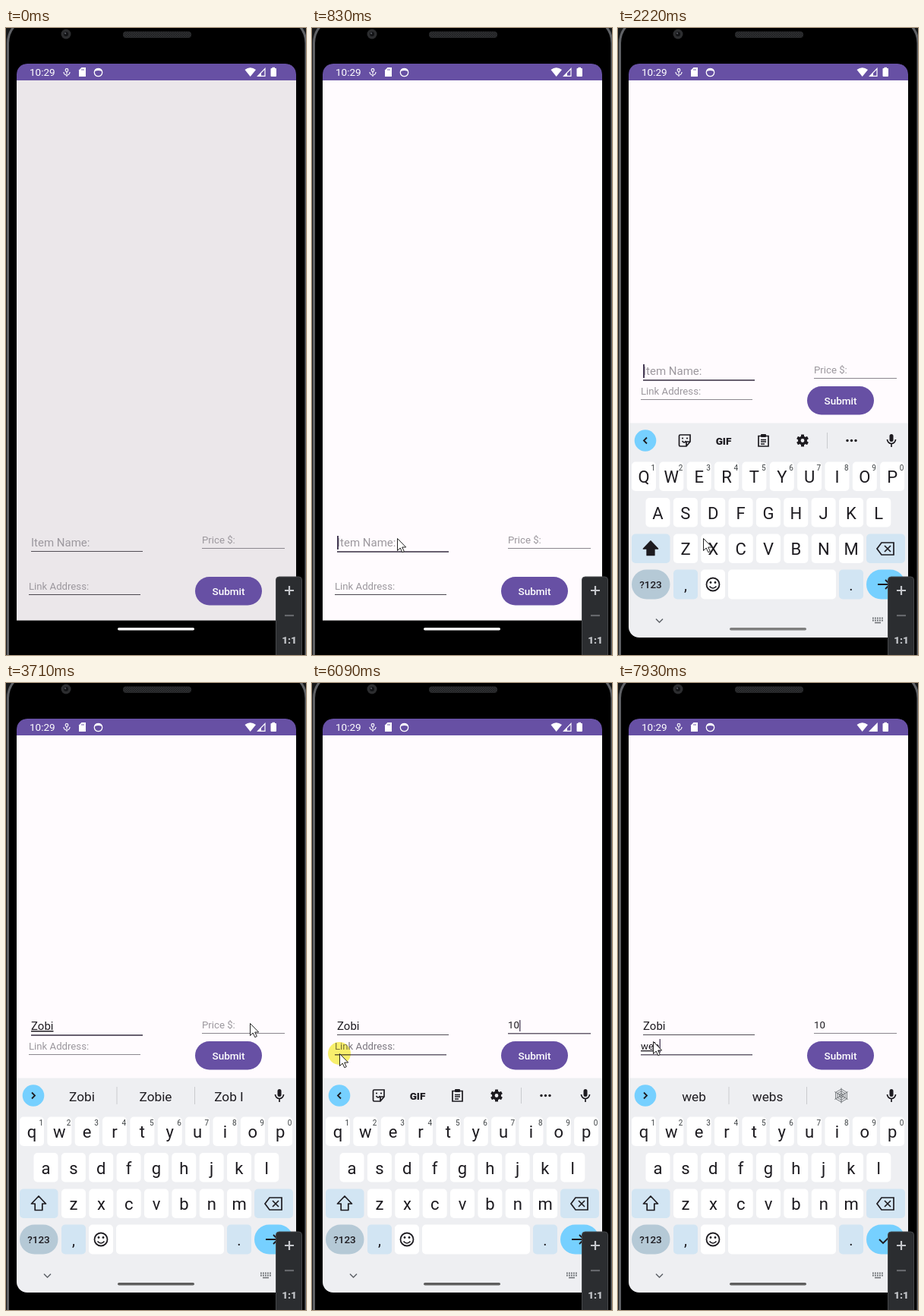
Recreate the animation shown at these times as an HTML page. Size 395 by 826 pixels, loop 8000 ms.

```html
<!DOCTYPE html>
<html lang="en">
<head>
<meta charset="utf-8">
<title>Item form</title>
<style>
  html, body { margin: 0; width: 100%; height: 100%; overflow: hidden; background: #000; }
  svg { display: block; width: 100%; height: 100%; font-family: Roboto, sans-serif; }
</style>
</head>
<body>
<svg id="stage" viewBox="0 0 395 826"></svg>
<script>
const LOOP = 8000;
const PURPLE = '#6750a4', INK = '#1d1b20', KEY_BLUE = '#d2e5f3', SKY = '#76d0ff';
const stage = document.getElementById('stage');
const pen = document.createElement('canvas').getContext('2d');

// Timelines: [start, value]
const itemText = [[0, ''], [2290, 'Z'], [2490, 'Zo'], [2630, 'Zob'], [2690, 'Zobi']];
const priceText = [[0, ''], [4450, '1'], [4730, '10']];
const linkText = [[0, ''], [6990, 'w'], [7120, 'we'], [7660, 'web']];
const focusOn = [[0, ''], [760, 'item'], [4120, 'price'], [6150, 'link']];
const caretReset = [[0, 0], [810, 810], [2290, 2290], [2760, 2760], [4120, 4120],
  [4450, 4450], [4730, 4730], [6150, 6150], [6990, 6990], [7120, 7120], [7660, 7660]];
const suggestions = [[0, null], [2290, ['Z', 'Zoo', 'Zip']], [2630, ['Zo', 'Zoo', 'Zone']],
  [2690, ['Zob', 'Zoo', 'Zone']], [2890, ['Zobi', 'Zobie', 'Zob I']], [4120, null],
  [6990, ['w', 'we', 'was']], [7390, ['we', 'were', 'weather']], [7860, ['web', 'webs', '']]];
const clicks = [[650, 770], [4020, 4150], [5930, 6130]];
// Pointer stops: [time, x, y]
const pointer = [[0, 190, 835], [200, 180, 830], [600, 112, 672], [3230, 112, 672], [3640, 318, 450],
  [3710, 321, 448], [3800, 330, 452], [4000, 311, 447], [5000, 311, 447], [5060, 301, 452],
  [5330, 170, 540], [5430, 110, 552], [5650, 20, 510], [5830, 36, 488], [6250, 36, 488],
  [6600, 46, 472], [8000, 46, 472]];

const clamp = v => Math.max(0, Math.min(1, v));
const ramp = (t, a, b) => clamp((t - a) / (b - a));
const mix = (a, b, k) => a + (b - a) * k;
const smooth = k => k * k * (3 - 2 * k);
const at = (list, t) => list.filter(s => s[0] <= t).pop()[1];

function pointerAt(t) {
  const i = pointer.findIndex(p => p[0] > t);
  const a = pointer[i - 1], b = pointer[i], k = smooth(ramp(t, a[0], b[0]));
  return [mix(a[1], b[1], k), mix(a[2], b[2], k)];
}

const rect = (x, y, w, h, fill, r = 0, more = '') =>
  `<rect x="${x}" y="${y}" width="${w}" height="${h}" rx="${r}" fill="${fill}" ${more}/>`;
const circle = (x, y, r, fill, more = '') => `<circle cx="${x}" cy="${y}" r="${r}" fill="${fill}" ${more}/>`;
const shape = (d, fill, more = '') => `<path d="${d}" fill="${fill}" ${more}/>`;
const line = (d, color = INK, w = 1.7, more = '') =>
  `<path d="${d}" fill="none" stroke="${color}" stroke-width="${w}" ${more}/>`;
const text = (x, y, s, size, fill = INK, more = '') =>
  `<text x="${x}" y="${y}" font-size="${size}" fill="${fill}" ${more}>${s}</text>`;
const MID = 'text-anchor="middle"';

function phone() {
  return rect(0, 0, 395, 826, '#171819')
    + rect(2.5, -14, 392.5, 900, '#000', 34, 'stroke="#606266" stroke-width="3"')
    + circle(79, 8, 6.5, '#2c2d2f') + circle(79, 8, 3, '#121315') + circle(78, 7, 1.2, '#4c4f55')
    + rect(154, 4.5, 90, 8.5, 'url(#mesh)', 4);
}

function statusBar(t) {
  const w = '#fff';
  return shape('M14 69V61Q14 47 28 47H368Q382 47 382 61V69Z', PURPLE)
    + text(31, 63, '10:29', 13.5, w)
    + line('M76 58a4 4 0 0 0 8 0M80 62v2', w, 1.2) + circle(80, 55.5, 1.9, 'none', 'stroke="#fff" stroke-width="1.1"')
    + line('M80 57.5v3', w, 1.2)
    + shape('M99.5 52H105V64H96V55.5Z', w) + line('M100 54v2M102 54v2', PURPLE, .9)
    + circle(121.5, 58.5, 5.2, 'none', 'stroke="#fff" stroke-width="1.3"')
    + shape('M117 57Q117.5 53 121.5 53T126 57Q121.5 55 117 57Z', w)
    + shape('M314.5 55Q321.5 49.5 329 55L321.7 64Z', w)
    + (t < 6400 ? line('M341 53.5V63.3H331.5Z', w, 1.2) + shape('M336 59V64H331Z', w)
                : shape('M341.8 52V64H330Z', w))
    + rect(348.5, 53, 7.5, 11, w, 1) + rect(350.5, 51.8, 3.5, 2, w);
}

function field(f, t, focus) {
  const value = at(f.values, t), focused = focus === f.name;
  const pressed = f.name === 'link' && t >= 5990 && !focused;
  let out = value
    ? text(f.x, f.y, value, f.size, INK, f.composing ? 'text-decoration="underline"' : '')
    : text(f.x, f.y, f.hint, f.size, pressed ? '#7c7880' : '#9c989e');
  out += focused || pressed
    ? rect(f.x, f.base, f.w, f.thick, '#675f6f')
    : rect(f.x, f.base, f.w, 1, f.color);
  if (focused && (t - at(caretReset, t)) % 1000 < 500) {
    pen.font = `${f.size}px Roboto, sans-serif`;
    out += rect(f.x + pen.measureText(value).width + (value ? .3 : 0), f.y - f.caret, value ? 1.3 : 2, f.caret + 4, '#493d58');
  }
  return out;
}

function form(t) {
  const up = t >= 890, focus = at(focusOn, t), by = up ? 472 : 723;
  const fields = [
    { name: 'item', x: 33, y: up ? 457 : 683, base: up ? 463 : 689, w: 147, size: 15, caret: 14, thick: 2,
      hint: 'Item Name:', values: itemText, color: '#514d55', composing: t >= 2290 && t < 4120 },
    { name: 'price', x: 258, y: up ? 455 : 679, base: up ? 461 : 685, w: 109, size: 13.2, caret: 11, thick: 1.5,
      hint: 'Price $:', values: priceText, color: '#8b878e' },
    { name: 'link', x: 30, y: up ? 483 : 740, base: up ? 489 : 746, w: 147, size: 13.2, caret: 14, thick: 1.5,
      hint: 'Link Address:', values: linkText, color: up ? '#8b878e' : '#4a464e', composing: true }
  ];
  return rect(14, 69, 368, 711.5, '#fffbfe')
    + rect(14, 69, 368, 711.5, '#000', 0, `opacity="${.078 * (1 - ramp(t, 0, 250))}"`)
    + fields.map(f => field(f, t, focus)).join('')
    + rect(249, by, 88, 37.5, PURPLE, 18.75)
    + text(293, by + 24, 'Submit', 13.5, '#fff', MID + ' font-weight="500"');
}

function gear(x, y) {
  let out = circle(x, y, 4.2, 'none', `stroke="${INK}" stroke-width="3.6"`);
  for (let a = 0; a < 360; a += 60) out += rect(x - 2, y - 8, 4, 3.5, INK, .6, `transform="rotate(${a} ${x} ${y})"`);
  return out;
}

function web(x, y) {
  const ring = r => [...Array(6)].map((_, i) => {
    const a = (i + .5) * Math.PI / 3;
    return [x + r * Math.cos(a), y + r * Math.sin(a)].map(v => v.toFixed(1)).join(' ');
  });
  return [3, 5.8, 8.5].map(r => line('M' + ring(r).join('L') + 'Z', '#5a5f63', .8)).join('')
    + line(ring(10).map(p => `M${x} ${y}L${p}`).join(''), '#5a5f63', .8);
}

function strip(words) {
  let out = circle(36, 543.5, 14.3, SKY)
    + line(words ? 'M34 539.5L38 543.5L34 547.5' : 'M38 539.5L34 543.5L38 547.5', INK, 1.8)
    + rect(357.5, 535, 5, 10, INK, 2.5) + line('M354.5 542a5.5 5.5 0 0 0 11 0M360 547.5V552');
  if (words) {
    out += rect(145.5, 532, 1, 23, '#c9cbce') + rect(248, 532, 1, 23, '#c9cbce');
    return out + words.map((s, i) => s ? text([100, 197, 293.5][i], 550.5, s, 17.2, INK, MID) : web(294, 543.5)).join('');
  }
  return out
    + line('M82 536h13v9l-5 6h-8q-1.5 0-1.5-1.5v-12q0-1.5 1.5-1.5M95 545h-5v6M84.5 544q3 4 5 0')
    + circle(85, 540.5, 1.1, INK) + circle(91, 540.5, 1.1, INK)
    + text(139, 548.5, 'GIF', 13.5, INK, MID + ' font-weight="900"')
    + line('M185 537.5h13v13.5h-13z') + rect(188, 535, 7, 4, INK, 1)
    + line('M188 542.5h7M188 545h7M188 548h5', INK, 1.3)
    + gear(243, 543.5) + rect(275, 533, 1, 21, '#c9cbce')
    + [302, 307.5, 313].map(x => circle(x, 543.5, 1.7, INK)).join('');
}

function keyRow(letters, x0, y, digits) {
  return [...letters].map((c, i) => {
    const x = x0 + i * 36.35;
    return rect(x - 16, y, 32, 38.5, '#fff', 5) + text(x, y + 27.5, c, 22, INK, MID)
      + (digits ? text(x + 12.3, y + 11, (i + 1) % 10, 10, '#3c4043', MID) : '');
  }).join('');
}

function keyboard(t) {
  const caps = t < 2290, set = s => caps ? s : s.toLowerCase();
  const dy = 283 * (1 - ramp(t, 880, 1100)) ** 2;
  return `<g transform="translate(0 ${dy})">` + rect(14, 520.5, 368, 283, '#eeeff2')
    + strip(at(suggestions, t))
    + keyRow(set('QWERTYUIOP'), 34, 571.5, true)
    + keyRow(set('ASDFGHJKL'), 52.5, 619)
    + keyRow(set('ZXCVBNM'), 89, 666.5)
    + rect(18, 666.5, 50.5, 38.5, KEY_BLUE, 5) + rect(327, 666.5, 51, 38.5, KEY_BLUE, 5)
    + shape('M43 676L52.5 686H47.8V694.5H38.2V686H33.5Z', caps ? INK : 'none', `stroke="${INK}" stroke-width="1.7" stroke-linejoin="round"`)
    + line('M341 686L347 678H363V694H347ZM351 682l8 8M359 682l-8 8')
    + rect(18, 713.5, 50.5, 39, '#b5c9d6', 19.5) + text(43, 738, '?123', 13.5, INK, MID + ' font-weight="500"')
    + rect(73, 713.5, 32, 39, KEY_BLUE, 5) + text(89, 741, ',', 20, INK, MID)
    + rect(109, 713.5, 32, 39, '#fff', 5) + circle(125, 733, 8.5, 'none', `stroke="${INK}" stroke-width="1.8"`)
    + circle(122, 730.5, 1.4, INK) + circle(128, 730.5, 1.4, INK) + line('M120.5 735.5q4.5 5 9 0')
    + rect(145, 713.5, 142, 39, '#fff', 5)
    + rect(291, 713.5, 32, 39, KEY_BLUE, 5) + text(307, 741, '.', 20, INK, MID)
    + rect(327, 713.5, 51, 39, SKY, 19.5)
    + line(t < 6150 ? 'M342 733H358M352 727l6 6l-6 6M362 727v12' : 'M344 733l5 5l10-10', INK, 1.9)
    + line('M50 778.5l4.5 4.5l4.5-4.5', '#5f6368', 1.5)
    + line('M335 777.5h14M335 780.5h14', '#6b6f73', 1.8, 'stroke-dasharray="1.8 1.2"') + line('M338 783.5h8', '#6b6f73', 1.6)
    + '</g>';
}

function handle(t) {
  const g = Math.round(mix(252, 94, ramp(t, 1150, 2500)));
  return rect(147, 790, 101, 3.6, `rgb(${g},${g},${g})`, 1.8);
}

function zoomPanel() {
  return rect(355.5, 723, 34, 120, '#2b2d30', 4, 'stroke="#46484b"')
    + line('M367 741h12M373 735v12', '#c6c8cc', 2.2) + line('M367 774h12', '#66686c', 2.2)
    + text(373, 811, '1:1', 13.5, '#c6c8cc', MID + ' font-weight="900"');
}

function cursor(t) {
  const [x, y] = pointerAt(t).map(v => Math.round(v));
  const pressed = clicks.some(([a, b]) => t >= a && t < b);
  return (pressed ? circle(x, y, 15, '#f8f36c', 'style="mix-blend-mode: multiply"') : '')
    + shape('M.5 .5V16.5L4.2 13L6.8 18.7L9.3 17.5L6.7 12H11.7Z', '#fff',
      `stroke="#222" transform="translate(${x} ${y})"`);
}

function scene(t) {
  return `<defs><clipPath id="screen">${rect(14, 47, 368, 756, '#fff', 14)}</clipPath>
    <pattern id="mesh" width="3" height="3" patternUnits="userSpaceOnUse">${rect(0, 0, 3, 3, '#303133')
      + circle(1, 1, .8, '#17181a') + circle(2.5, 2.5, .8, '#17181a')}</pattern></defs>`
    + phone() + `<g clip-path="url(#screen)">` + form(t) + statusBar(t) + (t >= 880 ? keyboard(t) : '')
    + handle(t) + '</g>' + zoomPanel() + cursor(t);
}

let shown = '';
function tick(now) {
  const next = scene(now % LOOP);
  if (next !== shown) stage.innerHTML = shown = next;
  requestAnimationFrame(tick);
}
tick(0);
</script>
</body>
</html>
```
